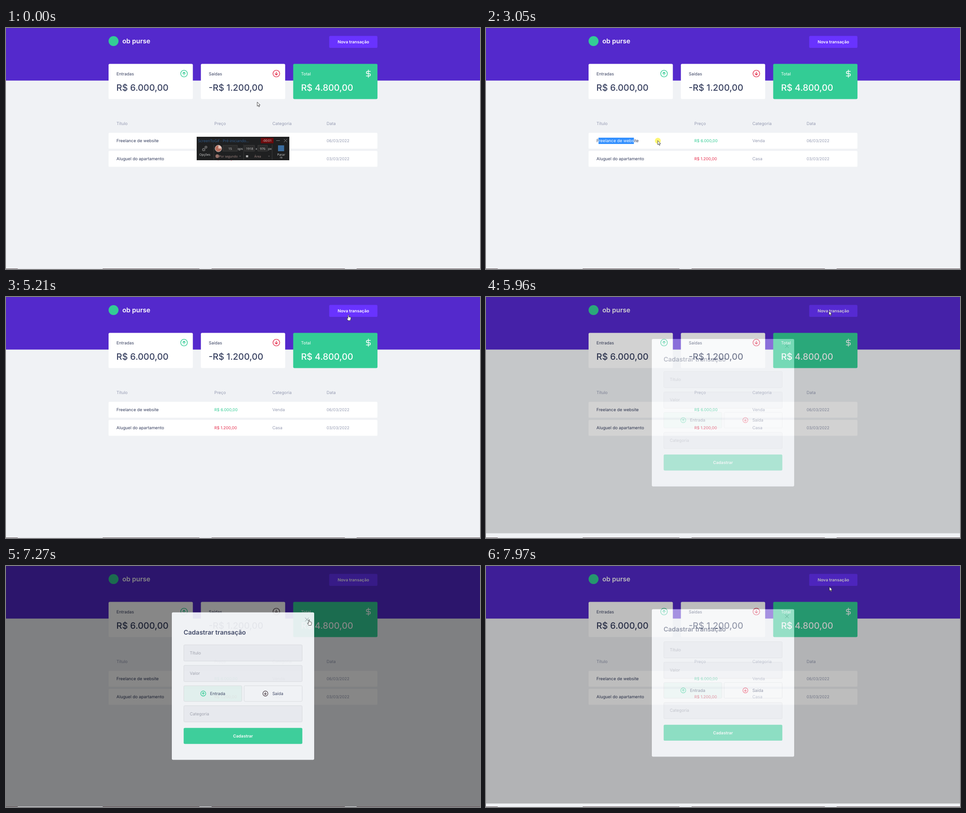
Animation of 1049x534 px, one loop 8 s. Source, as an HTML page:

```html
<!DOCTYPE html>
<html lang="pt-BR">
<head>
<meta charset="utf-8">
<title>Painel financeiro</title>
<style>
  html, body { margin: 0; width: 100%; height: 100%; overflow: hidden; background: #f0f2f5; }
  svg { display: block; width: 1049px; height: 534px; }
  text { font: 400 9.3px Inter, sans-serif; text-rendering: geometricPrecision; fill: #363f5f; }
  .brand { font-size: 14.5px; font-weight: 600; }
  .btn { font-size: 9.2px; font-weight: 600; text-anchor: middle; }
  .value { font-size: 19.5px; font-weight: 500; }
  .heading { font-size: 14px; font-weight: 600; }
  .white { fill: #fff; }
  .muted { fill: #969cb3; }
  .num { font-size: 8.9px; }
  .in { fill: #33cc95; }
  .out { fill: #e52e4d; }
  .hint { fill: #9a9da9; }
  .field { fill: #e7e9ee; stroke: #d7d9dd; }
  .icon { fill: none; stroke-width: 1.4; stroke-linecap: round; stroke-linejoin: round; }
  .up { stroke: #33cc95; }
  .down { stroke: #e52e4d; }
  .dim .down { stroke: #55484f; }
  #selected text { fill: #fff; }
  #recorder text { font: 400 7px "Open Sans", sans-serif; fill: #d8d8d8; text-anchor: middle; }
  #recorder .caption { font-size: 8.5px; fill: #315f93; text-anchor: start; }
  #recorder .soft { fill: #a58a86; }
  #recorder .tiny { font-size: 5px; }
  #recorder .box { fill: #2b2b2b; stroke: #454545; stroke-width: .7; }
</style>
</head>
<body>
<svg id="stage" viewBox="0 0 1049 534">
  <clipPath id="range"><rect id="range1" x="249" y="243" height="14"/><rect id="range2" x="244" y="283" height="14"/></clipPath>
  <g id="page"></g>
  <g id="selected" clip-path="url(#range)"></g>
  <g id="recorder"></g>
  <g id="modal"></g>
  <path d="M0 533.5H1049" stroke="#66575c"/>
  <path d="M26 533.5H214M428 533.5H455M750 533.5H776" stroke="#e4e4e8"/>
  <g id="cursor">
    <circle id="press" cx=".3" cy=".3" r="6.6" fill="#fdf566" opacity=".9"/>
    <g fill="#fff" stroke="#222" stroke-width=".8" stroke-linejoin="round">
      <path id="arrow" d="M0 0V9.3L2.1 7.3L3.6 10.7L5.1 10L3.7 6.8H6.5Z"/>
      <path id="hand" d="M-1 1a1 1 0 0 1 2 0V4.5L4.8 5.2Q5.8 5.5 5.7 6.7L5 10.5L4.3 12.5H-.8L-3.3 8.5Q-3.9 7 -2.6 7L-1 8.3Z"/>
    </g>
  </g>
</svg>

<script>
const $ = id => document.getElementById(id);
const LOOP = 8000;
const GREEN = '#33cc95';

// Drawing helpers; each adds to the current layer.
let layer;
function add(tag, attrs, content = '') {
  const node = document.createElementNS('http://www.w3.org/2000/svg', tag);
  for (const key in attrs) node.setAttribute(key, attrs[key]);
  node.textContent = content;
  layer.append(node);
  return node;
}
const text = (x, y, content, cls = '') => add('text', { x, y, class: cls }, content);
const rect = (x, y, width, height, attrs) => add('rect', { x, y, width, height, ...attrs });
const circle = (cx, cy, r, attrs) => add('circle', { cx, cy, r, ...attrs });
const line = (d, attrs) => add('path', { d, fill: 'none', ...attrs });

function arrowIcon(x, y, r, dir) {
  const tip = (dir === 'up' ? -.43 : .43) * r, wing = tip * .07;
  circle(x, y, r, { class: `icon ${dir}` });
  line(`M${x} ${y - tip}V${y + tip}M${x - .4 * r} ${y + wing}L${x} ${y + tip}L${x + .4 * r} ${y + wing}`, { class: `icon ${dir}` });
}

function drawPage() {
  layer = $('page');
  rect(0, 0, 1049, 534, { fill: '#f0f2f5' });
  rect(0, 0, 1049, 116.5, { fill: '#5429cc' });
  circle(238, 29, 11, { fill: GREEN });
  text(257.5, 33.7, 'ob purse', 'brand white');
  rect(715.3, 17.5, 106.7, 26.6, { rx: 2.7, fill: '#6933ff' });
  text(768.8, 34, 'Nova transação', 'btn white');

  const cards = [['Entradas', 'R$ 6.000,00'], ['Saídas', '-R$ 1.200,00'], ['Total', 'R$ 4.800,00']];
  cards.forEach(([label, value], i) => {
    const x = 227 + 204.3 * i, total = i === 2;
    rect(x, 79.5, 186.5, 78, { rx: 2.7, fill: total ? GREEN : '#fff' });
    text(x + 17.5, 104.5, label, total ? 'white' : '');
    text(x + 17.3, 139.3, value, total ? 'value white' : 'value');
    if (!total) arrowIcon(x + 167, 101, 7.4, i ? 'down' : 'up');
  });
  line('M802 93V109.5M806.5 96.2H800a2.5 2.5 0 0 0 0 5H804a2.5 2.5 0 0 1 0 5H797.3', { class: 'icon', stroke: '#fff' });

  const columns = [244.5, 461, 589.5, 709.5];
  ['Título', 'Preço', 'Categoria', 'Data'].forEach((name, i) => text(columns[i], 215, name, 'muted'));
  const rows = [
    ['Freelance de website', 'R$ 6.000,00', 'Venda', '06/03/2022'],
    ['Aluguel do apartamento', 'R$ 1.200,00', 'Casa', '03/03/2022'],
  ];
  rows.forEach((cells, r) => {
    const y = 253 + 40 * r;
    const styles = ['', r ? 'num out' : 'num in', 'muted', 'num muted'];
    layer = $('page');
    rect(227, y - 20.8, 595, 35.4, { rx: 2.2, fill: '#fff' });
    cells.forEach((cell, c) => {
      layer = $('page');
      const width = text(columns[c], y, cell, styles[c]).getComputedTextLength();
      layer = $('selected');
      rect(columns[c], y - 10, width, 14, { fill: '#3390ff' });
      text(columns[c], y, cell, styles[c]);
    });
  });
}

function drawRecorder() {
  layer = $('recorder');
  const input = (x, width, content) => {
    rect(x, 260, width, 13, { class: 'box' });
    text(x + width / 2, 269.5, content);
  };
  rect(422, 241, 205, 52, { fill: '#1f2021' });
  text(425, 253, 'ScreenToGif - Pré-iniciando...', 'caption');
  rect(564, 243.5, 28, 12, { fill: '#6d0b0d' });
  text(578, 252, '-00:01');
  line('M598 249.5H606M615 246L622 253M622 246L615 253', { stroke: '#999', 'stroke-width': .8 });
  line('M460 258V292M526 258V292M589 258V292', { stroke: '#444', 'stroke-width': .8 });
  circle(437.5, 269.5, 2.5, { fill: 'none', stroke: '#666', 'stroke-width': 2.2 });
  circle(442.5, 264, 2, { fill: 'none', stroke: '#666', 'stroke-width': 2.2 });
  text(440, 282.5, 'Opções');
  circle(470, 267, 7.3, { fill: '#b56d5c', stroke: '#ddd', 'stroke-width': .8 });
  line('M470 267V260A7 7 0 0 1 477 267Z', { fill: '#e6c3b8' });
  input(480, 32, '15');
  text(518.5, 269.5, 'qps');
  input(528, 22, '1918');
  text(554, 269.5, 'x');
  input(557.5, 21, '976');
  text(584, 269.5, 'px');
  rect(602, 260, 13.5, 13, { fill: '#3a6c9f' });
  text(609, 282.5, 'Parar');
  text(609, 289, 'F8', 'tiny');
  circle(467.5, 284, 4, { fill: '#97716a' });
  text(492, 287, 'Por segundo', 'soft');
  line('M516 283H520L518 285.5ZM580 283H584L582 285.5Z', { fill: '#555' });
  rect(531, 282, 5, 4.5, { fill: '#aaa' });
  text(557, 287, 'Área', 'soft');
}

function drawModal() {
  layer = $('modal');
  rect(0, 0, 1049, 534, { opacity: .5 });
  rect(367, 103.4, 315, 326.8, { rx: 2.7, fill: '#f0f2f5' });
  line('M662 115.3l8 8m0 -8l-8 8', { stroke: '#8b8d95' });
  text(393, 153, 'Cadastrar transação', 'heading');
  ['Título', 'Valor', 'Categoria'].forEach((hint, i) => {
    const y = 175.4 + 45.4 * i + (i === 2 ? 44 : 0);
    rect(393.5, y, 262, 36, { rx: 2.2, class: 'field' });
    text(406.8, y + 21, hint, 'hint');
  });
  ['Entrada', 'Saída'].forEach((kind, i) => {
    const x = 393.5 + 133.5 * i;
    rect(x, 265.9, 128.5, 34.8, { rx: 2.2, class: 'field', style: `fill: ${i ? '#f0f2f5' : '#dfeeec'}` });
    arrowIcon(x + 43 + 4 * i, 283.3, 5.6, i ? 'down' : 'up');
    text(x + 57.9 + 4.5 * i, 286.7, kind);
  });
  rect(393.2, 359.5, 262.6, 35.3, { rx: 2.7, fill: GREEN });
  text(524.5, 380.5, 'Cadastrar', 'btn white');
}

// Cursor key points: time, x, y
const path = [
  [70, 556, 164], [130, 540, 202], [610, 531, 208], [810, 531, 208],
  [1300, 231, 88], [1650, 362, 119], [2250, 737, 160], [2420, 735, 243],
  [2830, 252, 250], [2980, 290, 249], [3260, 650, 251], [3550, 831, 300],
  [4090, 735, 313], [4580, 508, 215], [4930, 749, 84], [5210, 758, 38],
  [5490, 759, 31], [5960, 759, 31], [6170, 767, 123], [6450, 700, 126],
  [6900, 667, 119], [7200, 667, 119], [7410, 745, 120], [7620, 760, 46],
];
const DRAG = { from: 2880, to: 3800, cleared: 3980 };
const CLICKS = [DRAG.cleared, 5880, 7130, 7820];
const OPEN = 5898, CLOSE = 7200, REOPEN = 7872, FADE = 320;

const clamp = (v, low = 0, high = 1) => Math.min(high, Math.max(low, v));
const easeOut = p => 1 - (1 - clamp(p)) ** 2;

// The screen refreshes every 70 ms; later on the beat slips 10 ms per block.
function refresh(t) {
  const start = t < 3610 ? 40 : t - (t - 3610) % 760;
  return Math.max(0, start + Math.floor((t - start) / 70) * 70);
}

function pointer(t) {
  const next = path.findIndex(p => p[0] >= t);
  const i = next < 0 ? path.length - 1 : Math.max(1, next);
  const [t0, x0, y0] = path[i - 1], [t1, x1, y1] = path[i];
  const k = clamp((t - t0) / (t1 - t0));
  return [x0 + (x1 - x0) * k, y0 + (y1 - y0) * k];
}

function modalState(t) {
  const closing = t >= CLOSE && t < REOPEN;
  const start = t >= REOPEN ? REOPEN : closing ? CLOSE : OPEN;
  const k = easeOut((t - start) / FADE);
  const opacity = closing ? 1 - k : k;
  return { opacity, shift: (closing ? -10.4 : -16) * (1 - opacity) };
}

const show = (id, on) => $(id).setAttribute('visibility', on ? 'visible' : 'hidden');

function draw(t) {
  const [x, y] = pointer(t);
  const { opacity, shift } = modalState(t);
  const onButton = x > 715 && x < 822 && y > 17 && y < 44;
  const onClose = Math.hypot(x - 666, y - 119) < 7;
  const hand = opacity > 0 ? onClose : onButton;
  const dragging = t >= DRAG.from && t < DRAG.to;

  $('cursor').setAttribute('transform', `translate(${x} ${y})`);
  show('arrow', !hand);
  show('hand', hand);
  show('press', dragging || CLICKS.some(c => t >= c && t < c + 70));
  show('recorder', t < 40);

  $('modal').setAttribute('opacity', opacity);
  $('modal').setAttribute('transform', `translate(0 ${shift})`);
  $('stage').classList.toggle('dim', opacity > .9);

  // the highlighted text trails the cursor slightly
  const selecting = t >= DRAG.from && t < DRAG.cleared;
  const [endX, endY] = pointer(Math.min(t, DRAG.to) - 41);
  const below = endY > 275;
  $('range1').setAttribute('width', selecting ? Math.max(0, (below ? 822 : endX) - 249) : 0);
  $('range2').setAttribute('width', selecting && below ? endX - 244 : 0);
}

drawPage();
drawRecorder();
drawModal();

const began = performance.now();
function tick() {
  draw(refresh((performance.now() - began) % LOOP));
  requestAnimationFrame(tick);
}
tick();
</script>
</body>
</html>
```
